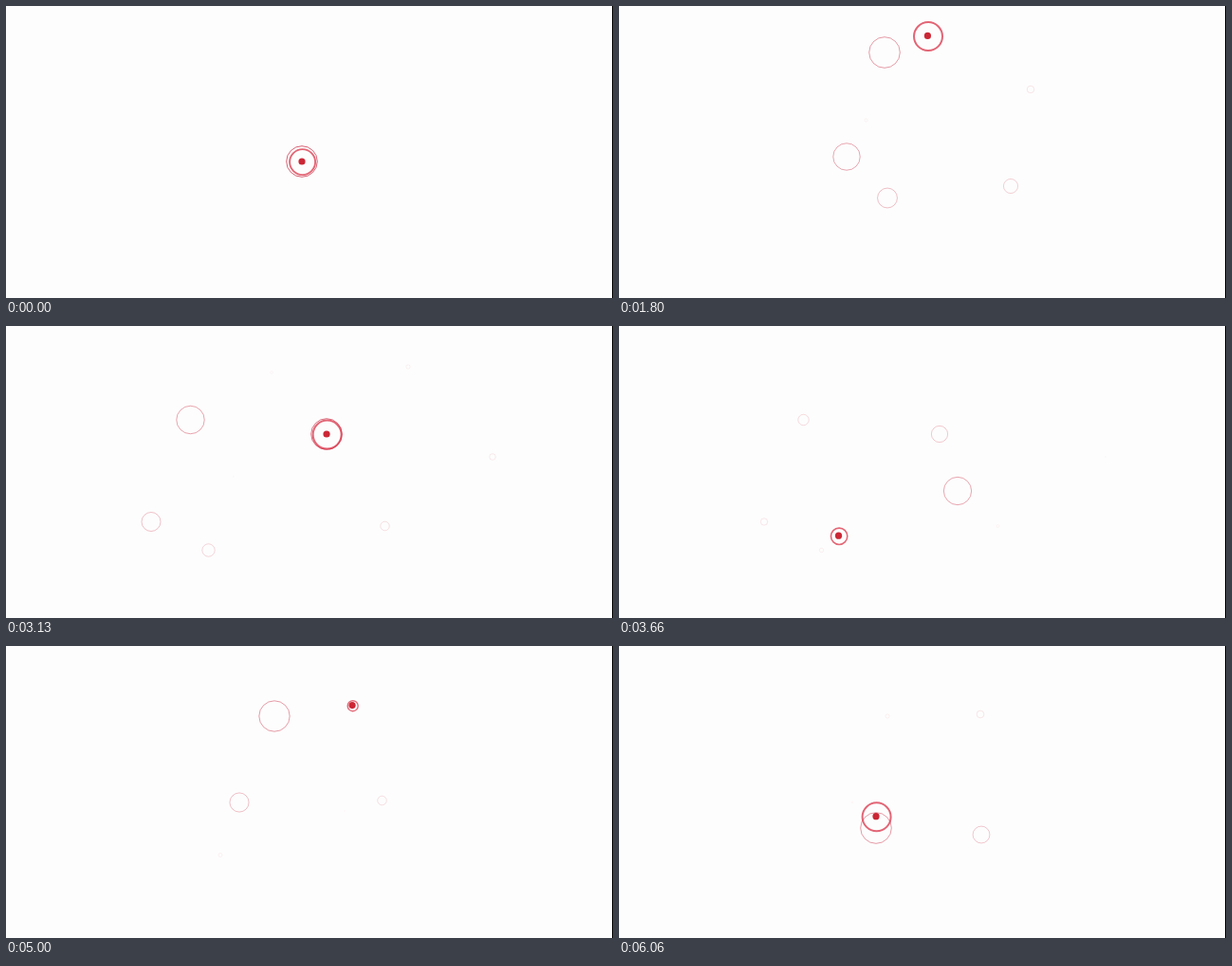
An HTML page with a canvas for the animation above (6.13 s loop, 640 by 308 pixels).

```html
<!DOCTYPE html>
<html lang="en">
<head>
<meta charset="utf-8">
<title>Roaming dot</title>
<style>
  html, body { margin: 0; width: 100%; height: 100%; overflow: hidden; background: #fdfdfd; }
  canvas { display: block; }
</style>
</head>
<body>
<canvas id="stage" width="640" height="308"></canvas>
<script>
const LOOP = 6130;
const STEP = 200 / 3;
const FULL_RADIUS = 16.3;
const BOW = 18;
const ctx = document.getElementById('stage').getContext('2d');

const clamp = v => Math.max(0, Math.min(1, v));
const easeInOut = p => p < 0.5 ? 4 * p ** 3 : 1 - 4 * (1 - p) ** 3;

// Tempo: arrival times at a few stops; those between are evenly spaced.
const tempo = [[0, 15], [1, 455], [3, 1180], [10, 2445], [13, 3120],
  [15, 3730], [17, 4540], [19, 5095], [21, 5980], [22, 6295]];

function arrival(index) {
  const k = Math.max(1, tempo.findIndex(([i]) => i >= index));
  const [i0, t0] = tempo[k - 1], [i1, t1] = tempo[k];
  return t0 + (t1 - t0) * (index - i0) / (i1 - i0);
}

const stops = `312,164 260.5,120.5 434,88 413,190 283,202.5 240,159 280,49 424,43
  513,138 399.5,211 213.5,236.5 153,206.5 194.5,99 338,114 357,174 226,220.5
  396.5,163 246,165 283,74 381,72 382,199 271,192 330,74`
  .split(/\s+/)
  .map((point, index) => {
    const [x, y] = point.split(',').map(Number);
    return { x, y, time: arrival(index) };
  });

// Every hop eases in and out along a gentle clockwise arc.
function dotAt(t) {
  const next = Math.max(1, stops.findIndex(s => s.time > t));
  const a = stops[next - 1], b = stops[next];
  const p = easeInOut(clamp((t - a.time) / (b.time - a.time)));
  const dx = b.x - a.x, dy = b.y - a.y;
  const bend = BOW * 4 * p * (1 - p) / Math.hypot(dx, dy);
  return { x: a.x + dx * p + dy * bend, y: a.y + dy * p - dx * bend };
}

function ring(x, y, radius, width, color, alpha) {
  ctx.globalAlpha = alpha;
  ctx.lineWidth = width;
  ctx.strokeStyle = color;
  ctx.beginPath();
  ctx.arc(x, y, radius, 0, 2 * Math.PI);
  ctx.stroke();
}

// A ring left at a stop holds briefly, then shrinks and fades away.
function drawTrace(stop, t) {
  const age = t - stop.time;
  if (age < -20) return;
  const radius = Math.min(FULL_RADIUS, 18 * Math.exp((160 - age) / 640) - 1.2);
  if (radius < 0.4) return;
  const fresh = clamp(1 - age / 60);
  ring(stop.x, stop.y, radius, 1, '#c8233c', (0.45 + 0.25 * fresh) * radius / FULL_RADIUS);
}

// The ring around the dot opens on arrival and closes on departure.
function focusAt(t) {
  return Math.max(...stops.map(({ time }) =>
    Math.min(clamp((t - time + 150) / 150), clamp((time + 150 - t) / 60))));
}

function draw(t) {
  ctx.globalAlpha = 1;
  ctx.fillStyle = '#fdfdfd';
  ctx.fillRect(0, 0, 640, 308);
  stops.forEach(stop => drawTrace(stop, t));

  const dot = dotAt(t);
  const focus = focusAt(t);
  if (focus > 0.25) ring(dot.x + 0.6, dot.y + 0.6, 15 * focus, 1 + focus, '#d8263c', 0.7);

  ctx.globalAlpha = 1;
  ctx.fillStyle = '#cb2735';
  ctx.beginPath();
  ctx.arc(dot.x, dot.y, 3.6, 0, 2 * Math.PI);
  ctx.fill();
  ctx.fillStyle = '#000';
  ctx.fillRect(639, 0, 1, 308);
}

const start = performance.now();
function tick() {
  const t = Math.max(0, performance.now() - start) % LOOP;
  // Fifteen pictures a second, with start times cut to 10 ms.
  const step = Math.floor((Math.floor(t / 10) * 10 + 7) / STEP);
  draw(step * STEP);
  requestAnimationFrame(tick);
}
tick();
</script>
</body>
</html>
```
